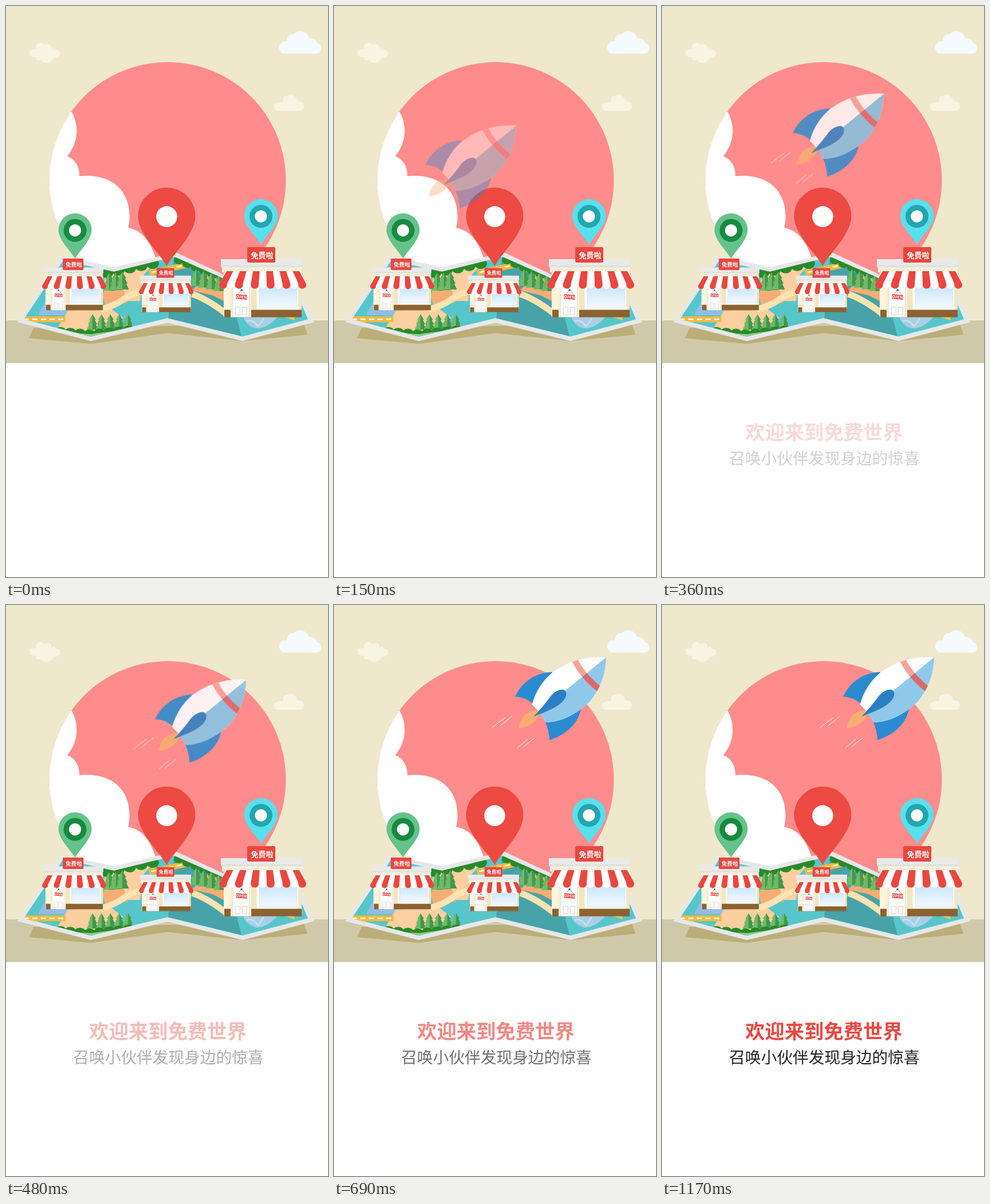
Recreate the animation shown at these times as an HTML page. Size 562 by 997 pixels, loop 1200 ms.

```html
<!DOCTYPE html>
<html lang="zh">
<head>
<meta charset="utf-8">
<title>欢迎</title>
<style>
  html, body { margin: 0; width: 100%; height: 100%; overflow: hidden; background: #fff; }
  svg { display: block; width: 562px; height: 997px; }
  text { font-family: "Noto Sans CJK SC", "Noto Sans CJK", "Noto Sans SC", sans-serif; text-anchor: middle; }
</style>
</head>
<body>
<svg viewBox="0 0 562 997">
  <defs>
    <clipPath id="sun"><circle cx="282" cy="304.5" r="206.5"/></clipPath>
    <clipPath id="sheet"><path d="M31 547L100 444L188 464L294 438L382 477L484 448L527 547L413 577L282 545L148 577Z"/></clipPath>
    <clipPath id="hull"><path id="hullShape" d="M475 91.5C440 89 410 97 381 118C362 134 351 154 345.5 174Q360 186 369 205C395 205 425 190 446 169C464 148 474 122 475 91.5Z"/></clipPath>
    <clipPath id="half"><path d="M475 91.5L348 195L369 240L490 200Z"/></clipPath>
    <clipPath id="awning"><path d="M13 42H140L152 64V66A6.9 6.6 0 0 1 138.2 66A6.9 6.6 0 0 1 124.4 66A6.9 6.6 0 0 1 110.5 66A6.9 6.6 0 0 1 96.7 66A6.9 6.6 0 0 1 82.9 66A6.9 6.6 0 0 1 69.1 66A6.9 6.6 0 0 1 55.3 66A6.9 6.6 0 0 1 41.5 66A6.9 6.6 0 0 1 27.6 66A6.9 6.6 0 0 1 13.8 66A6.9 6.6 0 0 1 0 66V64Z"/></clipPath>
    <linearGradient id="glass" x2="0" y2="1"><stop stop-color="#c9e5fb"/><stop offset="1" stop-color="#f3faff"/></linearGradient>

    <g id="shop">
      <path fill="#fcf5dc" d="M8 36H144V122H8Z"/>
      <path fill="#f1e6c4" d="M56 66H65V109H56ZM138 66H144V109H138Z"/>
      <path fill="#8b6231" d="M9 109.500H144V122.500H9Z"/>
      <path fill="#f8efd2" d="M20 66H56V122.500H20Z"/>
      <path fill="#fff" stroke="#dcdcd6" stroke-width=".8" d="M24 68H52V122H24Z"/>
      <path fill="none" stroke="#c9c9c4" stroke-width=".9" d="M28 105H36.5V118H28ZM40 105H48.5V118H40Z"/>
      <path fill="#fff" d="M67 66H138V108H67Z"/>
      <path fill="url(#glass)" stroke="#d5dfe4" stroke-width=".8" d="M70 68H136V106H70Z"/>
      <path fill="none" stroke="#777" stroke-width=".7" d="M31 84L39 75L47 84"/>
      <circle cx="39" cy="75" r="1.8" fill="#366f94"/>
      <g transform="rotate(4 39 87)">
        <path fill="#e8473f" d="M29.5 83H48.5V91H29.5Z"/>
        <text x="39" y="89.5" font-size="6.6" font-weight="700" fill="#fff">OPEN</text>
      </g>
      <path fill="#f6efda" d="M5 34H143V44H5Z"/>
      <path fill="#e9e9e9" d="M3 21H145V34H3Z"/>
      <path fill="#dfdfdf" d="M3 32H145V35H3Z"/>
      <g id="stripes" clip-path="url(#awning)"><path fill="#fff" d="M0 42H152V75H0Z"/></g>
      <rect x="49" y="0" width="49" height="27" rx="2.5" fill="#e9473f"/>
      <text x="75" y="19" font-size="13" font-weight="700" fill="#fff">免费啦</text>
    </g>

    <g id="tree">
      <path fill="#6cbb68" d="M0 0L-6 10H-4L-8 18H-6L-10 27H0Z"/>
      <path fill="#45964b" d="M0 0L6 10H4L8 18H6L10 27H0Z"/>
    </g>
  </defs>

  <path fill="#f0e8cc" d="M0 0H562V550H0Z"/>
  <path fill="#d0c9a9" d="M0 549H562V623.5H0Z"/>

  <path fill="#f7f4e2" d="M44 87Q38 83 41 78Q46 74 53 76Q50 67 58 65Q64 64 67 68Q74 63 79 70V74Q85 71 87 76Q95 77 94 84Q92 91 83 90Q81 98 73 99Q64 100 61 94Q53 98 52 89Q47 90 44 87Z"/>
  <path fill="#f7f4e2" d="M473 183Q467 181 468 174Q471 167 478 168H483Q482 157 491 157Q495 153 501 156Q508 159 508 166Q519 166 520 175Q519 183 513 183Z"/>
  <path fill="#f4faff" d="M485 83Q476 81 477 70Q480 60 490 62Q490 50 502 49Q509 42 518 45Q528 48 529 56Q541 55 543 65Q552 68 550 76Q548 83 540 83Z"/>

  <circle cx="282" cy="304.5" r="206.5" fill="#ff8c8c"/>
  <path clip-path="url(#sun)" fill="#fff" d="M114 184C127 205 128 237 107 262C121 268 128 280 128 297C184 292 215 321 215.5 366Q216 378 213 387C235 392 251 407 261 440V520H60V184Z"/>

  <path fill="#bcae78" d="M48 562L40 580L148 590L282 571L413 585L526 574L520 555Z"/>
  <path fill="#e5e8e9" d="M20 552L97 437L190 456L296 430L382 470L490 440L538 552L413 585L282 553L148 585Z"/>
  <g clip-path="url(#sheet)">
    <path fill="#57c6ca" d="M20 430H540V590H20Z"/>
    <path fill="#47a3a8" d="M294 430L282 560L413 585L382 460Z"/>
    <path fill="#8fbfe8" d="M72 510L56 540H105L118 525Z"/>
    <path fill="#fccf9f" d="M108 532L180 526L205 545L150 577L90 562Z"/>
    <path fill="#fccf9f" d="M172 475L215 450L262 446L240 470L234 515H172Z"/>
    <path fill="#f6ad74" d="M168 505L195 468L213 517L175 526Z"/>
    <path fill="#f6ad74" d="M325 497L350 470L384 478V517L360 505Z"/>
    <path fill="none" stroke="#fce3b0" stroke-width="11" d="M165 530Q190 523 205 512T240 498M325 503Q352 512 385 538"/>
    <path fill="none" stroke="#fdb83c" stroke-width="10" d="M27 547H104M250 466L326 450"/>
    <path fill="none" stroke="#fff" stroke-width="2.5" stroke-dasharray="9 6" d="M31 547H102M254 465L324 450"/>
    <path fill="#a8cfe6" d="M414 543H474Q455 564 436 563Q419 558 414 543Z"/>
    <path fill="none" stroke="#cfe4ef" stroke-width="2" d="M420 550Q432 546 440 560M450 545L440 560"/>
    <path fill="#fbc65c" d="M484 542L502 540L504 549Z"/>
    <g id="plants"></g>
    <path fill="#93d08d" d="M118 571L148 573L185 568L148 580Z"/>
  </g>

  <g id="pins"></g>
  <use href="#shop" transform="translate(63 441) scale(.737)"/>
  <use href="#shop" transform="translate(232 457.5) scale(.628)"/>
  <use href="#shop" transform="translate(372 421)"/>

  <g id="rocket">
    <path id="trail" fill="none" stroke="#fff" stroke-width=".9" d="M276 214L299 196M290 211L311 194M320 249.500L338 234M331 247.500L350 232"/>
    <path fill="#f8ae70" d="M322 215.5C326 194 340 181 360 184C359 202 343 212 322 215.5Z"/>
    <path fill="#2b8bd0" d="M316 160C326 138 348 118 381 117L349 174Q333 160 316 160ZM376 236Q375 218 369 205L431 181C428 203 408 226 376 236Z"/>
    <use href="#hullShape" fill="#fff"/>
    <g clip-path="url(#hull)">
      <path id="shade" fill="#90c8ec" d="M475 91.5L348 195L369 240L490 200Z"/>
      <g fill="none" stroke-width="10.5">
        <path stroke="#f9a29c" d="M415 83Q427 121 472 154"/>
        <path stroke="#d9686b" clip-path="url(#half)" d="M415 83Q427 121 472 154"/>
      </g>
    </g>
    <path fill="#2b80c5" d="M348 195Q368 174 379 158Q389 147 400 147.500Q407 150 405 159C399 176 373 185 348 195Z"/>
  </g>

  <g id="words">
    <text x="282.5" y="756.5" font-size="34.3" font-weight="700" fill="#eb4840">欢迎来到免费世界</text>
    <text x="283.5" y="800" font-size="27.7" font-weight="300" fill="#222">召唤小伙伴发现身边的惊喜</text>
  </g>
</svg>
<script>
const LOOP = 1200;
const $ = id => document.getElementById(id);

function add(parent, tag, attrs) {
  const el = document.createElementNS('http://www.w3.org/2000/svg', tag);
  for (const k in attrs) el.setAttribute(k, attrs[k]);
  return parent.appendChild(el);
}

for (let i = 0; i < 11; i += 2) {
  const top = n => 13 + n * 127 / 11, foot = n => n * 152 / 11;
  add($('stripes'), 'path', {
    fill: '#e9473f',
    d: `M${top(i)} 42H${top(i + 1)}L${foot(i + 1)} 64V75H${foot(i)}V64Z`
  });
}

function trees(x, y, n, gap, slope = 0, size = 1) {
  for (let i = 0; i < n; i++)
    add($('plants'), 'use', {
      href: '#tree', transform: `translate(${x + i * gap} ${y + i * slope}) scale(${size})`
    });
}

function hedge(x1, y1, x2, y2, n, r) {
  for (let i = 0; i < n; i++) {
    const k = i / (n - 1);
    add($('plants'), 'ellipse', {
      cx: x1 + (x2 - x1) * k, cy: y1 + (y2 - y1) * k, rx: r, ry: r * .8, fill: '#278a27'
    });
  }
}

hedge(176, 466, 256, 450, 5, 11);
hedge(302, 444, 376, 475, 6, 9);
trees(180, 466, 3, 11.5, -1, 1.15);
trees(332, 459, 4, 13.5, 3, 1.1);
trees(151, 538, 5, 15.5, 0, 1);
hedge(78, 567, 146, 573, 5, 10);
hedge(146, 573, 214, 566, 5, 10);

function pin(x, y, r, tip, color, rings) {
  const c = r * .62, h = tip - y;
  add($('pins'), 'path', {
    fill: color,
    d: `M${x} ${tip}C${x - r * .22} ${y + h * .76} ${x - r} ${y + c} ${x - r} ${y}` +
       `A${r} ${r} 0 0 1 ${x + r} ${y}C${x + r} ${y + c} ${x + r * .22} ${y + h * .76} ${x} ${tip}Z`
  });
  for (const [size, fill] of rings) add($('pins'), 'circle', { cx: x, cy: y + .8, r: size, fill });
}

pin(280.5, 367, 50, 454, '#ec4a42', [[18.3, '#fff']]);
pin(120.5, 391, 29, 441, '#66c28a', [[20, '#178a41'], [10.6, '#fff']]);
pin(445, 366.5, 29.3, 416.5, '#58e0ec', [[20, '#23a6ae'], [10.6, '#fff']]);

// Each step is [milliseconds, style]
function play(id, steps) {
  const frames = steps.map(([ms, style]) => ({ offset: ms / LOOP, ...style }));
  $(id).animate(frames, { duration: LOOP, iterations: Infinity });
}

const at = (x, y, opacity = 1) => ({ transform: `translate(${x}px, ${y}px)`, opacity });

play('rocket', [
  [0, at(-210, 162, 0)],
  [300, at(-104, 73.3, .78)],
  [690, at(0, 0)],
  [LOOP, at(0, 0)]
]);
play('trail', [
  [0, at(.3, -.2)], [210, at(0, 0)], [450, at(2.4, -1.8)], [690, at(0, 0)],
  [930, at(2.4, -1.8)], [1170, at(0, 0)], [LOOP, at(.3, -.2)]
]);
play('shade', [
  [0, { fill: '#68c4dc' }], [690, { fill: '#90c8ec' }], [LOOP, { fill: '#90c8ec' }]
]);
play('words', [
  [0, { opacity: 0 }], [210, { opacity: 0 }], [950, { opacity: 1 }], [LOOP, { opacity: 1 }]
]);
</script>
</body>
</html>
```
